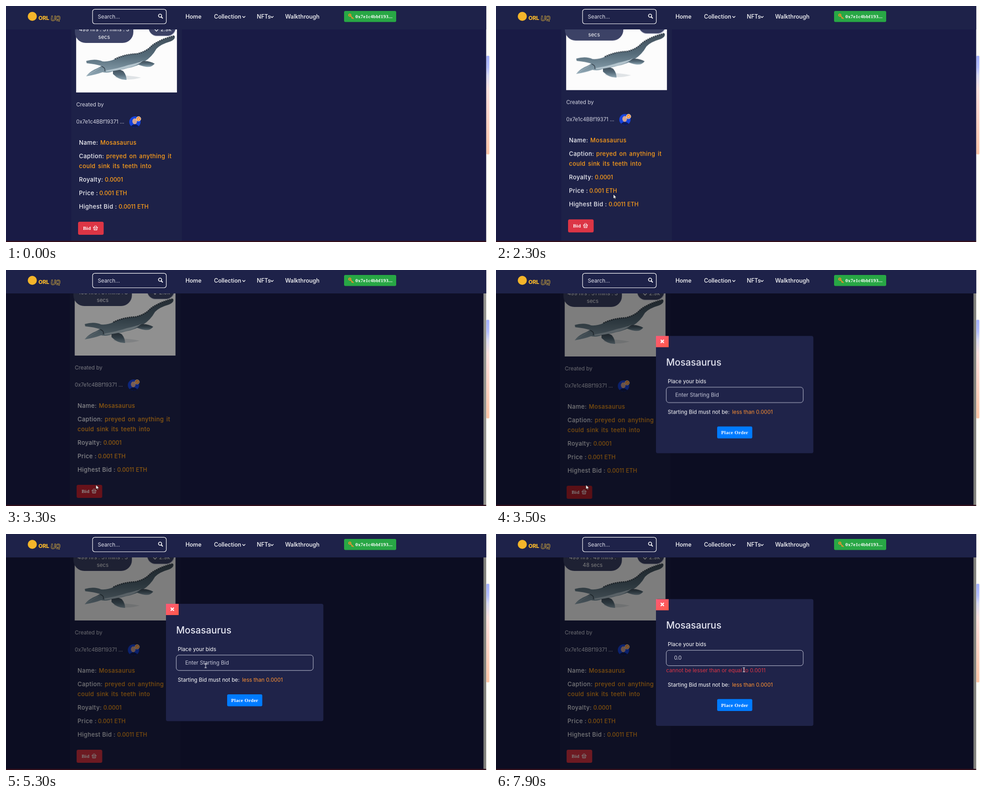
An HTML page that plays this animation: 1068 by 524 pixels, repeating every 8 s.

```html
<!DOCTYPE html>
<html lang="en">
<head>
<meta charset="utf-8">
<title>Auction bid</title>
<style>
html, body { margin: 0; height: 100%; overflow: hidden; background: #191b45; }
svg { display: block; width: 100%; height: 100%; }
text { font: 400 11.7px Inter, sans-serif; fill: #fff; white-space: pre; }
.mid { text-anchor: middle; }
.nav text { font-size: 12.5px; font-weight: 500; }
.soft text { fill: #d9dae6; }
.facts text { font-size: 13px; font-weight: 500; letter-spacing: .4px; fill: #f4f4f8; }
.facts .val { fill: #ff9f1a; word-spacing: 1.7px; }
.facts .num { font-size: 12.5px; letter-spacing: -.1px; word-spacing: 1px; }
.serif { font: 700 11px "Liberation Serif", serif; letter-spacing: .25px; }
.line { fill: none; stroke: #fff; stroke-linecap: round; stroke-linejoin: round; }

/* One loop is 8 s, so 100 ms is 1.25%; every change is a hard step. */
.shift, .lift, .bid, .gutter, .shade, .modal, .panel, .up, .down, .caret,
.cursor, .arrow, .beam, .before, .after, .dot, .digit {
  animation: 8s step-end infinite;
}
.shift { animation-name: shift; }
.lift { animation-name: lift; }
.bid { fill: #dc3545; animation-name: bid; }
.gutter { animation-name: gutter; }
.shade { animation-name: shade; }
.modal { animation-name: modal; }
.panel { y: 155px; height: 260.5px; animation-name: panel; }
.up { animation-name: up; }
.down { animation-name: down; }
.before { animation-name: before; }
.after { animation-name: after; }
.dot { animation-name: dot; }
.digit { animation-name: digit; }
.caret { animation-name: caret; }
.cursor { animation-name: cursor; }
.arrow { animation-name: arrow; }
.beam { animation-name: beam; }

@keyframes shift { 0% { transform: none } 40%, 100% { transform: translateX(-3.2px) } }
@keyframes lift {
  0% { transform: none }
  10% { transform: translateY(-1px) }
  11.25% { transform: translateY(-2.9px) }
  12.5% { transform: translateY(-4.5px) }
  13.75% { transform: translateY(-5.3px) }
  41.25% { transform: translateY(-2px) }
  42.5% { transform: translateY(-.5px) }
  43.75%, 100% { transform: none }
}
@keyframes bid {
  0% { fill: #dc3545 }
  33.75% { fill: #c82333 }
  38.75% { fill: #b5202d }
  47.5%, 100% { fill: #dc3545 }
}
@keyframes gutter { 0% { opacity: 0 } 40%, 100% { opacity: 1 } }
@keyframes shade {
  0% { opacity: 0 }
  40% { opacity: .06 }
  41.25% { opacity: .43 }
  42.5%, 100% { opacity: .5 }
}
@keyframes modal {
  0% { opacity: 0; transform: translateY(-50px) }
  42.5% { opacity: .5; transform: translateY(-30px) }
  43.75% { opacity: 1; transform: translateY(-8.6px) }
  46.25% { opacity: 1; transform: translateY(-1.5px) }
  47.5%, 100% { opacity: 1; transform: none }
}
@keyframes panel { 0% { y: 155px; height: 260.5px } 70%, 100% { y: 144.4px; height: 281.7px } }
@keyframes up { 0% { transform: none } 70%, 100% { transform: translateY(-10.6px) } }
@keyframes down { 0% { transform: none } 70%, 100% { transform: translateY(10.6px) } }
@keyframes before { 0% { opacity: 1 } 70%, 100% { opacity: 0 } }
@keyframes after { 0% { opacity: 0 } 70%, 100% { opacity: 1 } }
@keyframes dot { 0% { opacity: 0 } 78.75%, 100% { opacity: 1 } }
@keyframes digit { 0% { opacity: 0 } 80%, 100% { opacity: 1 } }
@keyframes caret {
  0% { opacity: 0; transform: none }
  61.25% { opacity: 1; transform: none }
  66.25% { opacity: 0; transform: none }
  70% { opacity: 1; transform: translateX(8.5px) }
  73.75% { opacity: 0; transform: translateX(8.5px) }
  78.75% { opacity: 1; transform: translateX(11px) }
  80% { opacity: 1; transform: translateX(17px) }
  86.25% { opacity: 0; transform: translateX(17px) }
  92.5% { opacity: 1; transform: translateX(17px) }
  98.75%, 100% { opacity: 0; transform: translateX(17px) }
}
@keyframes cursor {
  0% { transform: translate(245px, 310px) }
  11.25% { transform: translate(262px, 355px) }
  12.5% { transform: translate(271px, 385px) }
  13.75% { transform: translate(275.5px, 401px) }
  15% { transform: translate(279px, 428.5px) }
  17.5% { transform: translate(284px, 432px) }
  18.75% { transform: translate(288px, 439px) }
  20% { transform: translate(289px, 448px) }
  21.25% { transform: translate(284px, 452px) }
  22.5% { transform: translate(277px, 450px) }
  23.75% { transform: translate(270px, 445px) }
  25% { transform: translate(267px, 437px) }
  28.75% { transform: translate(259px, 418px) }
  30% { transform: translate(244px, 411px) }
  31.25% { transform: translate(227px, 430px) }
  32.5% { transform: translate(213px, 455px) }
  33.75% { transform: translate(202px, 475px) }
  35% { transform: translate(198.5px, 477px) }
  46.25% { transform: translate(300px, 437px) }
  47.5% { transform: translate(393px, 394.5px) }
  51.25% { transform: translate(405px, 370px) }
  52.5% { transform: translate(419px, 344px) }
  53.75% { transform: translate(430px, 320px) }
  55% { transform: translate(437px, 302px) }
  56.25% { transform: translate(440px, 295px) }
  57.5% { transform: translate(440.5px, 292.5px) }
  95% { transform: translate(461.5px, 291px) }
  97.5% { transform: translate(513px, 298px) }
  98.75%, 100% { transform: translate(547px, 301.5px) }
}
@keyframes arrow { 0% { opacity: 0 } 10% { opacity: 1 } 55%, 100% { opacity: 0 } }
@keyframes beam { 0% { opacity: 0 } 55%, 100% { opacity: 1 } }
</style>
</head>
<body>
<svg viewBox="0 0 1068 524">
  <defs>
    <linearGradient id="thumb" x2="0" y2="1">
      <stop offset="0" stop-color="#a3b0ff"/>
      <stop offset=".12" stop-color="#b4beff"/>
      <stop offset=".2" stop-color="#d9dbf4"/>
      <stop offset=".34" stop-color="#fae1de"/>
      <stop offset=".5" stop-color="#ffd9d2"/>
      <stop offset="1" stop-color="#ffc5a6"/>
    </linearGradient>
    <linearGradient id="skin" x2="0" y2="1">
      <stop offset="0" stop-color="#3f4d59"/>
      <stop offset=".5" stop-color="#566c7a"/>
      <stop offset="1" stop-color="#8fa7b4"/>
    </linearGradient>
    <linearGradient id="close" x2="1" y2="1">
      <stop offset="0" stop-color="#fb5a78"/>
      <stop offset="1" stop-color="#ff5a48"/>
    </linearGradient>
  </defs>

  <rect width="1068" height="524" fill="#191b45"/>
  <rect class="gutter" x="1053.6" y="52" width="7" height="470" fill="#fffff6"/>

  <g class="shift"><g class="lift">
    <rect x="144" y="30" width="244" height="510" fill="#1d2148"/>
    <rect x="154.8" y="20" width="222.4" height="172" fill="#fcfcfc"/>

    <path d="M240 158Q266 168 298 159Q275 154 250 154Z" fill="#dfe3e6"/>
    <g fill="url(#skin)">
      <path d="M177 122Q198 116 213 123Q228 124 240 118Q262 107 290 106Q310 101 322 88Q340 74 372 66Q375 74 362 79Q341 85 332 95Q322 113 306 123Q290 134 268 138Q252 143 238 144Q226 150 213 147Q197 153 177 156Q182 148 195 141Q205 137 210 133Q198 129 178 127Z"/>
      <path d="M236 142Q250 139 259 145Q266 154 266 164Q250 165 236 151Z"/>
      <path d="M293 124Q312 119 328 128Q321 137 309 135Q298 133 290 129Z"/>
    </g>
    <path d="M221 143Q250 138 270 131Q290 127 303 121Q288 134 266 138Q244 144 221 146Z" fill="#b3c4cd"/>
    <path d="M240 118Q262 107 290 106Q310 101 322 88Q340 74 372 66" fill="none" stroke="#36424d" stroke-width="3" stroke-dasharray="3 1.5"/>
    <path d="M179 154L207 138" stroke="#d5dde2" stroke-dasharray="1.5 2"/>
    <path d="M211 134Q220 137 218 145" fill="none" stroke="#36424d" stroke-width="1.5"/>

    <rect x="152" y="20" width="129" height="62" rx="24" fill="#3c4266"/>
    <g class="before">
      <text class="mid" x="216.5" y="56">499 hrs : 51 mins : 3</text>
      <text class="mid" x="216.5" y="72.5">secs</text>
    </g>
    <g class="after">
      <text class="mid" x="216.5" y="56">499 hrs : 49 mins :</text>
      <text class="mid" x="216.5" y="72.5">48 secs</text>
    </g>
    <rect x="315" y="22" width="60" height="45.5" rx="18" fill="#c9cbdb"/>
    <rect x="315" y="20" width="59" height="46" rx="18" fill="#3c4266"/>
    <path class="line" d="M332 56L328 51.5C326 48 330 46 332 49C334 46 338 48 336 51.5Z" stroke-width="1.3"/>
    <text x="341" y="56" font-size="11">2.9k</text>

    <g class="soft">
      <text x="155" y="223">Created by</text>
      <text x="155" y="261" style="font-size:11.4px">0x7e1c4BBf19371 ...</text>
    </g>
    <circle cx="284.5" cy="257.5" r="12.5" fill="#1743dc"/>
    <path d="M276 267Q284 258 293 267Q285 273 276 267Z" fill="#101a52"/>
    <ellipse cx="284" cy="256" rx="5.2" ry="6.5" fill="#d3a596"/>
    <circle cx="292.5" cy="250.5" r="5" fill="#f0913a" stroke="#fff" stroke-width=".9"/>
    <path class="line" d="M290.5 250.7l1.4 1.4 2.6-3" stroke-width="1"/>

    <g class="facts">
      <text x="161" y="307.5">Name:</text><text class="val" x="208" y="307.5">Mosasaurus</text>
      <text x="161" y="337.5">Caption:</text><text class="val" x="221" y="337.5">preyed on anything it</text>
      <text class="val" x="161" y="359.5">could sink its teeth into</text>
      <text x="161" y="389.5">Royalty:</text><text class="val num" x="218" y="389.5">0.0001</text>
      <text x="161" y="419.5">Price :</text><text class="val num" x="206" y="419.5">0.001 ETH</text>
      <text x="161" y="449.5">Highest Bid :</text><text class="val num" x="248.5" y="449.5">0.0011 ETH</text>
    </g>
    <rect class="bid" x="159" y="479" width="56.5" height="29" rx="3.5"/>
    <text class="serif" x="170" y="497.3">Bid</text>
    <path class="line" d="M192.5 491.5h10M193.5 492l1 5.5h6l1-5.5M194.5 491l2-3M200.5 491l-2-3M196.3 493.5v2.2M198.7 493.5v2.2" stroke-width="1.2"/>
  </g></g>

  <rect class="shade" y="52" width="1060" height="470"/>
  <rect y="521.5" width="1060" height="2.5" fill="#35101c"/>

  <rect x="1059.6" width="8.4" height="524" fill="#fffff8"/>
  <rect x="1060" y="110.5" width="6.5" height="219" rx="2" fill="url(#thumb)"/>

  <rect width="1059.6" height="52" fill="#1e2249"/>
  <circle cx="58" cy="23" r="10" fill="#f5b52a"/>
  <text x="71.5" y="30.5" style="font-size:12.3px;font-weight:800;fill:#f5b52a;letter-spacing:-.3px">ORL</text>
  <text x="98.5" y="32.5" style="font-size:15px;font-style:italic;font-weight:700;fill:none;stroke:#c9a13c;stroke-width:.8px;letter-spacing:-1px">UQ</text>
  <rect class="line" x="191" y="7.3" width="162.7" height="32.2" rx="5" stroke-width="1.2"/>
  <text x="202.5" y="27.7" style="fill:#e3e4ee">Search...</text>
  <path class="line" d="M342.6 24.2l2.8 2.8" stroke-width="2"/>
  <circle class="line" cx="340" cy="21.5" r="3.5" stroke-width="1.7"/>
  <g class="nav">
    <text x="396" y="28.2">Home</text>
    <text x="459" y="28.2">Collection</text>
    <text x="553.5" y="28.2">NFTs</text>
    <text x="616" y="28.2">Walkthrough</text>
  </g>
  <path class="line" d="M522 23l2.8 2.8 2.8-2.8M584.2 23l2.8 2.8 2.8-2.8" stroke-width="1.4"/>
  <rect x="746" y="11" width="115" height="24.5" rx="3" fill="#28a745"/>
  <path d="M759.5 21.5L767 28.5M764 26l-1.5 1.7" fill="none" stroke="#e8912d" stroke-width="2"/>
  <circle cx="758.7" cy="20.3" r="2.3" fill="none" stroke="#e8912d" stroke-width="2"/>
  <text class="serif" x="771" y="27">0x7e1c4bbf193...</text>

  <g class="modal">
    <rect class="panel" x="353" width="347.3" rx="4" fill="#1f2349"/>
    <g class="up">
      <rect x="353" y="155" width="28" height="25" fill="url(#close)"/>
      <path class="line" d="M364.3 164.3l5.4 5.4M369.7 164.3l-5.4 5.4" stroke-width="2.6"/>
      <text x="375.5" y="221" style="font-size:20.8px;font-weight:500;fill:#e6e7f3">Mosasaurus</text>
      <text x="379" y="259.5" font-weight="500">Place your bids</text>
      <rect x="375.7" y="268.8" width="302.2" height="34.2" rx="6" fill="none" stroke="#c9cbdc"/>
      <text class="before" x="395.5" y="290" style="fill:#c6c8d9">Enter Starting Bid</text>
      <g class="soft">
        <text class="after" x="393" y="290">0</text>
        <text class="dot" x="399.6" y="290">.</text>
        <text class="digit" x="402.3" y="290">0</text>
      </g>
      <rect class="caret" x="392" y="278" width="1" height="16" fill="#fff"/>
      <text class="after" x="375.5" y="317.8" style="fill:#dc3545">cannot be lesser than or equal to 0.0011</text>
    </g>
    <g class="down">
      <text x="379" y="328">Starting Bid must not be:</text>
      <text x="521" y="328" style="fill:#ff9233">less than 0.0001</text>
      <rect x="488" y="356" width="77.5" height="26.5" rx="3" fill="#007bff"/>
      <text class="serif mid" x="526.8" y="373">Place Order</text>
    </g>
  </g>

  <g class="cursor">
    <path class="arrow" d="M0 0V9.8L2.2 7.8L3.7 11L5.2 10.3L3.8 7.2H6.8Z" fill="#fff" stroke="#111" stroke-width=".7"/>
    <path class="line beam" d="M-2-4.5H2M0-4.5V4.5M-2 4.5H2" stroke-width="1"/>
  </g>
</svg>
</body>
</html>
```
